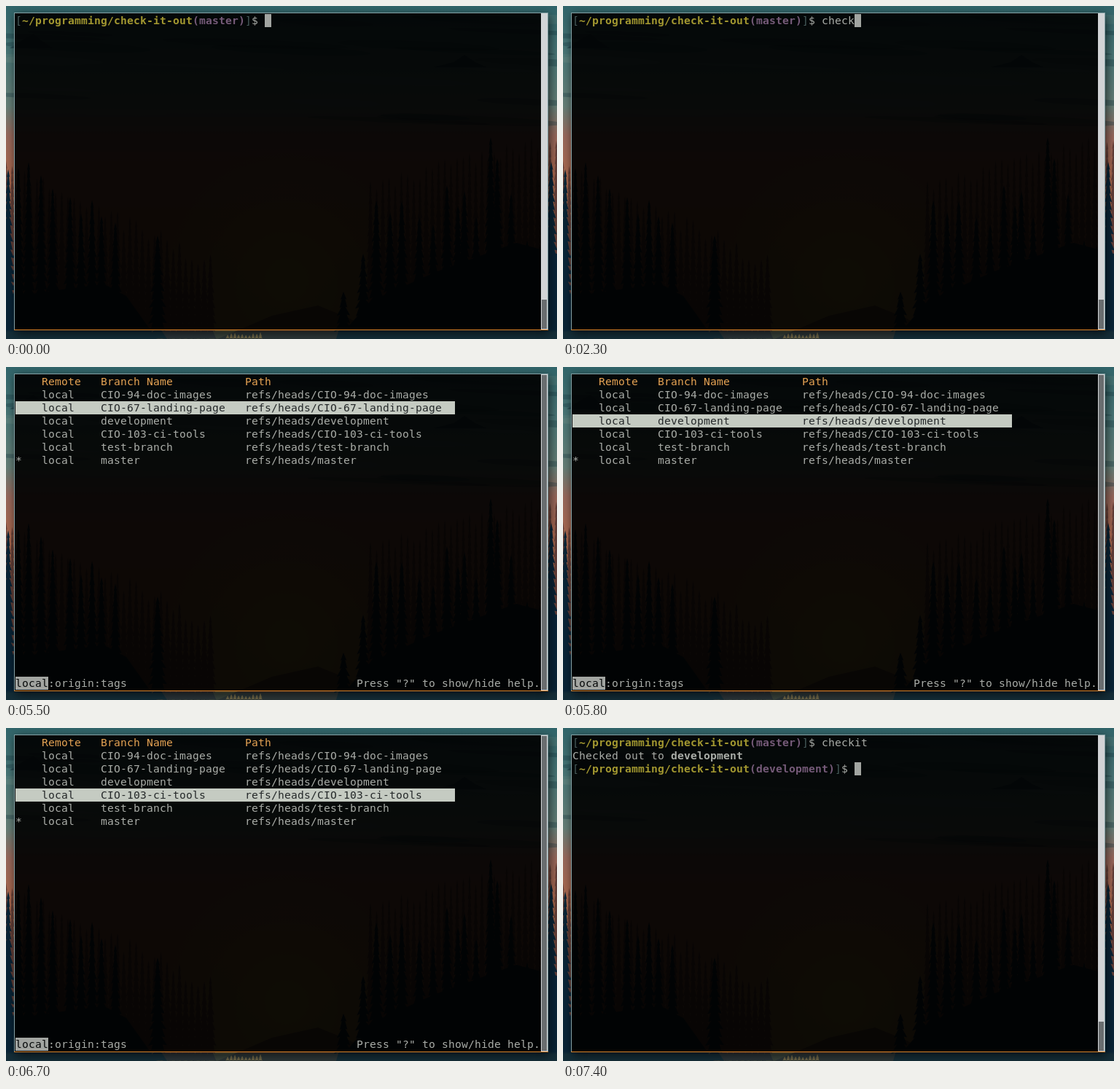
Animation, 756 px wide and 457 px high, one loop 8 s. Source, as an HTML page with a canvas:

```html
<!DOCTYPE html>
<html lang="en">
<head>
<meta charset="utf-8">
<title>Branch picker in a terminal</title>
<style>
html, body { margin: 0; width: 100%; height: 100%; overflow: hidden; background: #0b2435; }
canvas { display: block; }
</style>
</head>
<body>
<canvas id="stage" width="756" height="457"></canvas>
<script>
const W = 756, H = 457, LOOP = 8000;
const CELL = 9, LINE = 18, LEFT = 13, TOP = 11;
const FONT = '14.67px "DejaVu Sans Mono", monospace';
const ctx = document.getElementById('stage').getContext('2d');

const COLORS = {
  text: '#a9aca7', bracket: '#485c5b', path: '#a29730', branch: '#755a78',
  header: '#e5a253', select: '#c5cbc2', selectText: '#25292a', cursor: '#a2a5a1'
};

function makeLayer(paint) {
  const layer = document.createElement('canvas');
  layer.width = W;
  layer.height = H;
  paint(layer.getContext('2d'));
  return layer;
}

function seeded(seed) {
  return () => (seed = (seed * 16807) % 2147483647) / 2147483647;
}

function polygon(g, color, points) {
  g.fillStyle = color;
  g.beginPath();
  points.forEach(([x, y]) => g.lineTo(x, y));
  g.fill();
}

// A fir: tiers of branches that widen downwards
function fir(g, color, x, top, half, base = H) {
  const right = [], left = [], tiers = Math.max(5, Math.round((base - top) / 11));
  for (let i = 1; i <= tiers; i++) {
    const y = top + (base - top) * i / tiers;
    const reach = half * Math.min(1, 0.15 + 1.1 * i / tiers) * (i % 2 ? 1 : 0.8);
    right.push([x + reach, y], [x + reach * 0.5, y - 1]);
    left.unshift([x - reach * 0.5, y - 1], [x - reach, y + 1]);
  }
  polygon(g, color, [[x, top], ...right, ...left]);
}

function paintLandscape(g) {
  const sky = g.createLinearGradient(0, 0, 0, H);
  [[0, '#31656a'], [0.15, '#4a7777'], [0.3, '#667f77'], [0.39, '#98695c'],
   [0.5, '#a9684f'], [0.7, '#a8663f'], [1, '#907045']]
    .forEach(([at, color]) => sky.addColorStop(at, color));
  g.fillStyle = sky;
  g.fillRect(0, 0, W, H);

  // Thin clouds
  const random = seeded(41);
  for (let i = 0; i < 26; i++) {
    g.fillStyle = i % 3 ? 'rgba(18,54,64,.3)' : 'rgba(115,145,135,.2)';
    g.beginPath();
    g.ellipse(random() * W, 15 + random() * 145, 45 + random() * 90, 2 + random() * 5, 0.04, 0, 7);
    g.fill();
  }
  polygon(g, '#2c5158', [[5, 58], [25, 45], [38, 38], [48, 47], [64, 58]]);
  polygon(g, '#2c5158', [[586, 84], [614, 77], [629, 67], [644, 77], [660, 84]]);

  const glow = g.createRadialGradient(385, 375, 10, 385, 375, 190);
  glow.addColorStop(0, 'rgba(180,160,70,.9)');
  glow.addColorStop(1, 'rgba(180,140,70,0)');
  g.fillStyle = glow;
  g.fillRect(180, 180, 410, 277);

  // Hazy forest on both slopes
  for (let i = 0; i < 34; i++) {
    const x = i * 8.5;
    fir(g, '#633f38', x, 205 + x * 0.48 + random() * 24, 8);
  }
  for (let i = 0; i < 31; i++) {
    const x = 500 + i * 8.5;
    fir(g, '#633f38', x, 238 - i * 2.4 + random() * 22, 8);
  }
  polygon(g, '#6b4936', [[290, H], [365, 425], [428, 411], [470, 428], [520, H]]);

  const near = '#0a2537';
  [[3, 224], [17, 222], [31, 214], [48, 232], [64, 250], [88, 262], [103, 285],
   [118, 266], [131, 288], [150, 297]]
    .forEach(([x, y]) => fir(g, near, x, y, 11));
  fir(g, near, 208, 315, 13);
  [[463, 392], [490, 340], [508, 267], [527, 284], [543, 268], [567, 290], [586, 300],
   [605, 246], [620, 274], [629, 255], [645, 290], [665, 180], [674, 209], [693, 258],
   [715, 322], [732, 330], [748, 214]]
    .forEach(([x, y]) => fir(g, near, x, y, 13));
  polygon(g, near, [[0, 400], [85, 388], [135, 382], [165, 398], [207, H], [0, H]]);
  polygon(g, near, [[455, H], [500, 405], [590, 365], [700, 325], [W, 340], [W, H]]);

  const dusk = g.createLinearGradient(0, 444, 0, H);
  dusk.addColorStop(0, 'rgba(24,49,57,0)');
  dusk.addColorStop(0.3, 'rgba(24,49,57,.75)');
  g.fillStyle = dusk;
  g.fillRect(0, 444, W, 13);
  for (let x = 304; x < 350; x += 5) fir(g, '#6f6748', x, 447 + random() * 5, 3);
}

const landscape = makeLayer(paintLandscape);

const desktop = makeLayer(g => {
  g.drawImage(landscape, 0, 0);
  g.save();
  g.shadowColor = 'rgba(0,0,0,.65)';
  g.shadowBlur = 13;
  g.shadowOffsetX = 2;
  g.shadowOffsetY = 4;
  g.fillRect(11, 9, 733, 436);
  g.restore();
  g.drawImage(landscape, 11, 9, 733, 436, 11, 9, 733, 436);
  g.fillStyle = 'rgba(0,0,0,.92)';
  g.fillRect(11, 9, 733, 436);
  g.fillStyle = '#84a0a4';
  g.fillRect(11, 9, 733, 1);
  g.fillRect(11, 9, 1, 436);
  g.fillRect(743, 9, 1, 436);
  g.fillStyle = '#df8428';
  g.fillRect(11, 444, 733, 1);
});

function fillCells(col, row, count, color) {
  ctx.fillStyle = color;
  ctx.fillRect(LEFT + col * CELL, TOP + row * LINE, count * CELL, LINE);
}

// Writes on the character grid and returns the next free column
function write(text, col, row, color = COLORS.text, bold = false) {
  ctx.font = (bold ? 'bold ' : '') + FONT;
  ctx.fillStyle = color;
  for (const char of text) {
    ctx.fillText(char, LEFT + col * CELL, TOP + row * LINE + 14);
    col++;
  }
  return col;
}

function prompt(row, branch) {
  let col = write('[', 0, row, COLORS.bracket);
  col = write('~/programming/check-it-out', col, row, COLORS.path, true);
  col = write(`(${branch})`, col, row, COLORS.branch, true);
  col = write(']', col, row, COLORS.bracket);
  return write('$ ', col, row);
}

function scrollbar(thumbTop) {
  ctx.fillStyle = '#d2d4d6';
  ctx.fillRect(734, 10, 9, 434);
  ctx.fillStyle = '#696d6f';
  ctx.fillRect(735, thumbTop, 7, 443 - thumbTop);
}

function drawShell(typed, cursorOn) {
  scrollbar(403);
  const col = write(typed, prompt(0, 'master'), 0);
  if (cursorOn) fillCells(col, 0, 1, COLORS.cursor);
}

function drawResult() {
  scrollbar(403);
  write('checkit', prompt(0, 'master'), 0);
  write('development', write('Checked out to ', 0, 1), 1, COLORS.text, true);
  fillCells(prompt(2, 'development'), 2, 1, COLORS.cursor);
}

const BRANCHES = ['CIO-94-doc-images', 'CIO-67-landing-page', 'development',
  'CIO-103-ci-tools', 'test-branch', 'master'];

function writeColumns(row, remote, name, path, color) {
  write(remote, 4, row, color);
  write(name, 13, row, color);
  write(path, 35, row, color);
}

function drawPicker(selected) {
  scrollbar(11);
  writeColumns(0, 'Remote', 'Branch Name', 'Path', COLORS.header);
  BRANCHES.forEach((name, i) => {
    const active = i === selected;
    if (active) fillCells(0, i + 1, 67, COLORS.select);
    const color = active ? COLORS.selectText : COLORS.text;
    if (name === 'master') write('*', 0, i + 1, color);
    writeColumns(i + 1, 'local', name, 'refs/heads/' + name, color);
  });
  fillCells(0, 23, 5, COLORS.cursor);
  write('local', 0, 23, '#080b0b');
  write(':origin:tags', 5, 23);
  write('Press "?" to show/hide help.', 52, 23);
}

const KEY_TIMES = [1400, 1500, 1600, 2200, 2300];
const MOVES = [[3600, 0], [5500, 1], [5800, 2], [6100, 3], [6200, 4], [6700, 3], [6900, 2]];

function render() {
  const t = performance.now() % LOOP;
  ctx.drawImage(desktop, 0, 0);
  if (t < 3600) {
    const count = KEY_TIMES.filter(at => t >= at).length;
    drawShell('check'.slice(0, count), t < 100 || t >= 700);
  } else if (t < 7400) {
    drawPicker(MOVES.filter(([at]) => t >= at).pop()[1]);
  } else {
    drawResult();
  }
  requestAnimationFrame(render);
}
render();
</script>
</body>
</html>
```
